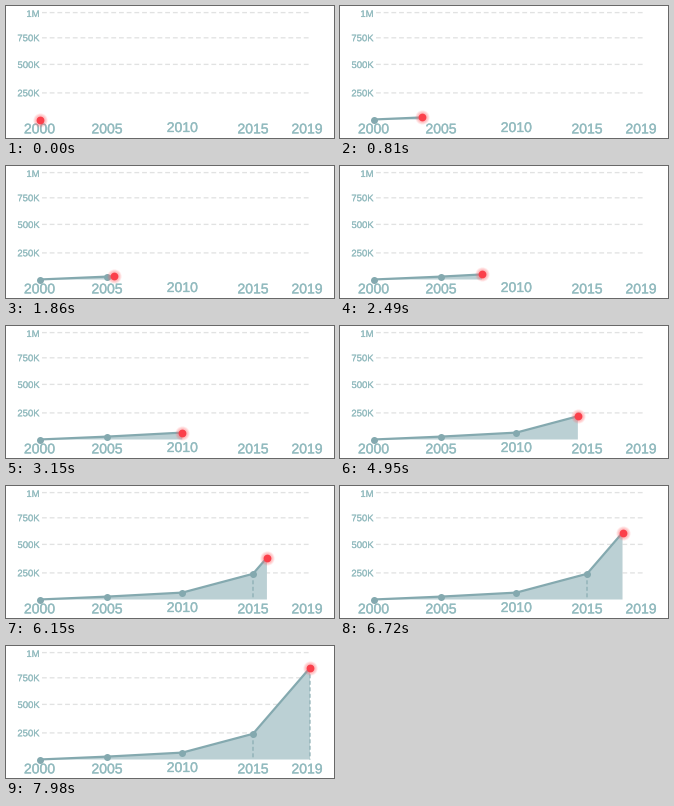
A matplotlib script for the animation above (8 s loop, 328 by 132 pixels).

```python
import numpy as np
import matplotlib.pyplot as plt
from matplotlib.animation import FuncAnimation
from matplotlib.patches import Polygon
from matplotlib.patheffects import withStroke

W, H, DPI = 328, 132, 64
LOOP, TICK, STEP = 8000, 20, 30
PX = 72 / DPI  # points per pixel

TEAL, LABEL, FILL = "#84a9af", "#92bbbf", "#bbd0d4"
GRID, RED, GLOW = "#e1e2e2", "#fb404b", "#ff6a70"

# data points, and when the marker leaves and reaches them
PTS = np.array([(33.5, 113.5), (101, 110.6), (176.3, 106.6),
                (247, 87.8), (304, 21.8)])
KEY_T = [0, 1095, 1735, 3070, 3708, 5100, 5733, 7317, LOOP]
KEY_X = PTS[[0, 1, 1, 2, 2, 3, 3, 4, 4], 0]
BASE = 113.5

fig = plt.figure(figsize=(W / DPI, H / DPI), dpi=DPI, facecolor="white")
ax = fig.add_axes([0, 0, 1, 1])
ax.set_xlim(0, W)
ax.set_ylim(H, 0)
ax.axis("off")


def label(x, y, text, size, ha, weight):
    ax.text(x, y, text, fontsize=size * PX, ha=ha, va="baseline",
            family="Liberation Sans", color=LABEL, zorder=1,
            path_effects=[withStroke(linewidth=weight * PX, foreground=LABEL)])


def dashed(xs, ys, color, width, dash, z):
    dashes = (0, [d / width for d in dash])
    return ax.plot(xs, ys, color=color, lw=width * PX, ls=dashes, snap=False,
                   dash_capstyle="butt", zorder=z)[0]


def disc(radius, color, z, alpha=1):
    return ax.plot([], [], "o", ms=2 * radius * PX, mew=0, color=color,
                   alpha=alpha, zorder=z, snap=False)[0]


for name, y, base in (("1M", 6.6, 11), ("750K", 31.8, 35.2),
                      ("500K", 58.4, 62), ("250K", 86.9, 90.3)):
    label(33.5, base, name, 9.5, "right", 0.15)
    dashed([36, 304], [y, y], GRID, 1.3, (4.8, 2.9), 0)

for name, x, base in (("2000", 33.5, 127.4), ("2005", 101, 127.4),
                      ("2010", 176.3, 126), ("2015", 247, 127.4),
                      ("2019", 301, 127.4)):
    label(x, base, name, 14, "center", 0.3)

area = ax.add_patch(Polygon(PTS[:3], closed=True, fc=FILL, ec="none", zorder=2))
drops = [dashed([x, x], [y, BASE], TEAL, 1.1, (4, 2.5), 3) for x, y in PTS[3:]]
line = ax.plot([], [], color=TEAL, lw=2.2 * PX, zorder=4,
               solid_joinstyle="round", solid_capstyle="round")[0]
dots = disc(3.5, TEAL, 5)
marker = [disc(r, GLOW, 6, 0.08) for r in np.linspace(7.2, 4.6, 7)]
marker.append(disc(3.9, RED, 7))


def draw(i):
    t = i * TICK // STEP * STEP
    x = np.interp(t, KEY_T, KEY_X)
    y = np.interp(x, *PTS.T)
    passed = PTS[PTS[:, 0] <= x]
    path = np.vstack([passed, (x, y)])
    line.set_data(*path.T)
    dots.set_data(*passed.T)
    area.set_xy(np.vstack([path, (x, BASE), (PTS[0, 0], BASE)]))
    for drop, px in zip(drops, PTS[3:, 0]):
        drop.set_visible(x >= px)
    for part in marker:
        part.set_data([x], [y])
    return [area, line, dots, *drops, *marker]


anim = FuncAnimation(fig, draw, frames=LOOP // TICK, interval=TICK,
                     init_func=lambda: draw(0), repeat=True, repeat_delay=0)
plt.show()
```
